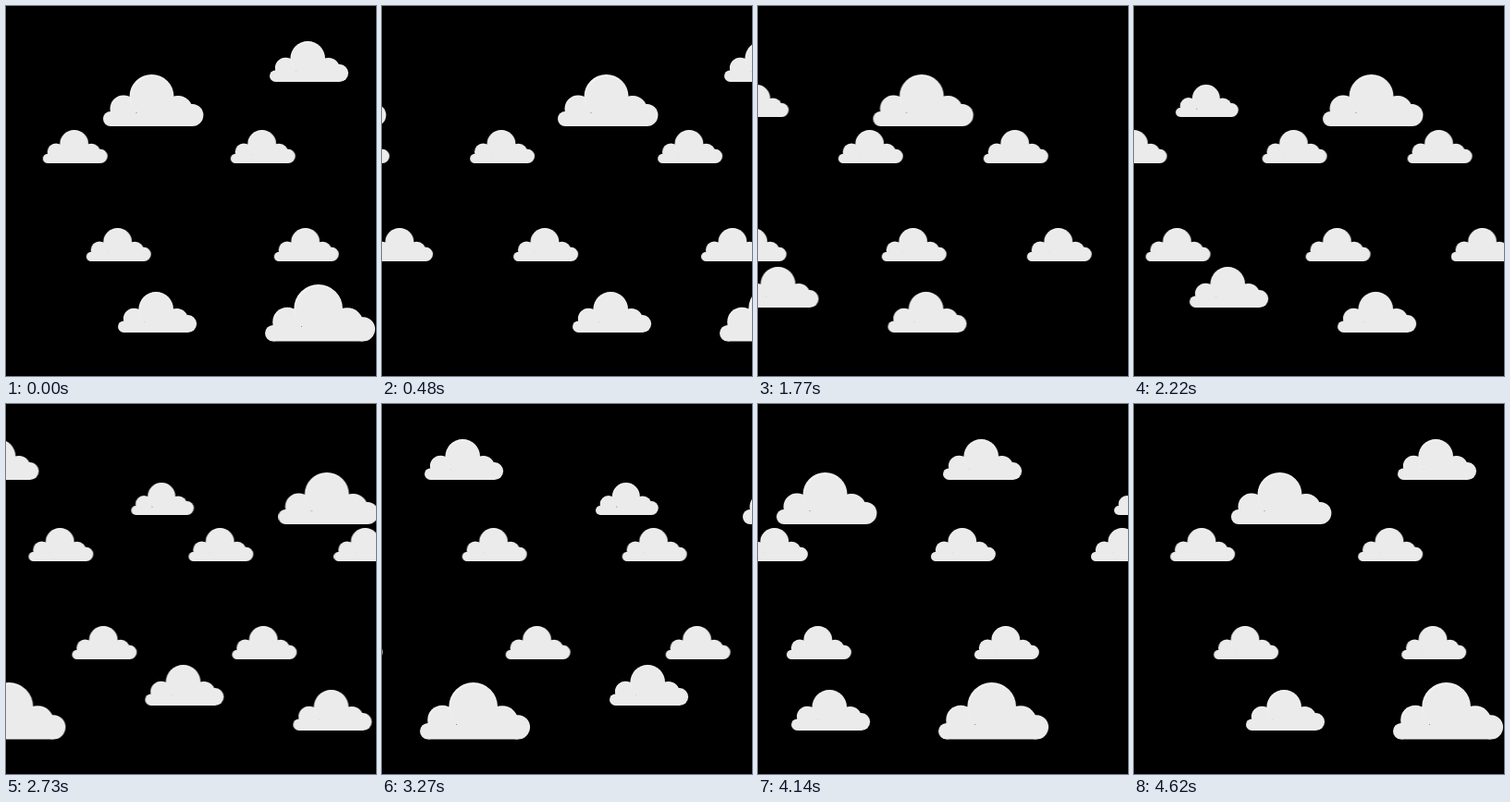
An HTML page for the animation above (4650 ms loop, 400 by 400 pixels).

```html
<!DOCTYPE html>
<html lang="en">
<head>
<meta charset="utf-8">
<title>Drifting clouds</title>
<style>
  html, body { margin: 0; width: 100%; height: 100%; overflow: hidden; background: #000; }
  svg { display: block; width: 100%; height: 100%; }
  /* 155 steps of 30 ms; the small delay keeps step edges clear of rounding */
  .layer { animation: drift 4650ms steps(155) -1ms infinite; }
  .near { --run: 823.31px; }
  .far { --run: 535.9px; }
  @keyframes drift {
    from { transform: translateX(0); }
    to { transform: translateX(var(--run)); }
  }
</style>
</head>
<body>
<svg viewBox="0 0 400 400">
  <defs>
    <radialGradient id="puff" cx=".53" cy=".55" r=".56">
      <stop offset=".86" stop-color="#ebebeb"/>
      <stop offset="1" stop-color="#f5f5f5"/>
    </radialGradient>
    <g id="cloud">
      <g fill="url(#puff)">
        <circle cx="96.4" cy="44" r="12"/>
        <circle cx="81" cy="39" r="16"/>
        <circle cx="8" cy="48" r="8"/>
        <circle cx="22" cy="37" r="14.5"/>
        <circle cx="52.5" cy="24" r="24"/>
      </g>
      <path d="M8 56V46L22 42H96.4V56Z" fill="#ebebeb"/>
    </g>
    <g id="pair">
      <use href="#cloud" transform="translate(0 134) scale(.645)"/>
      <use href="#cloud" transform="translate(47 240) scale(.645)"/>
    </g>
    <g id="duo">
      <use href="#cloud" transform="translate(105 74)"/>
      <use href="#cloud" transform="translate(121 309) scale(.785)"/>
    </g>
    <g id="farSet">
      <use href="#pair" x="242.8"/>
      <use href="#pair" x="39.8"/>
      <use href="#pair" x="-117.2"/>
    </g>
    <g id="nearSet">
      <use href="#duo"/>
      <use href="#duo" x="-294"/>
      <use href="#cloud" transform="translate(285 38) scale(.785)"/>
      <use href="#cloud" transform="translate(280 301) scale(1.098)"/>
      <use href="#cloud" transform="translate(-348 85) scale(.625)"/>
      <use href="#cloud" transform="translate(-333 282) scale(.785)"/>
    </g>
  </defs>
  <g class="layer far">
    <use href="#farSet"/>
    <use href="#farSet" x="-533"/>
  </g>
  <g class="layer near">
    <use href="#nearSet"/>
    <use href="#nearSet" x="-818"/>
  </g>
</svg>
</body>
</html>
```
